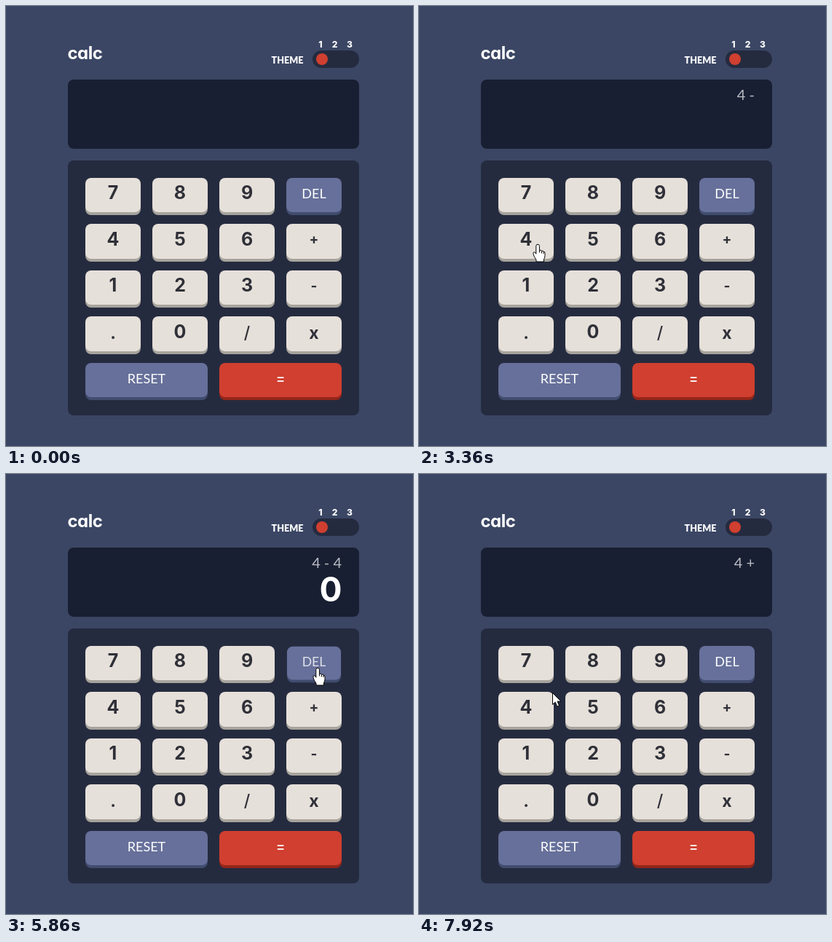
An HTML page that plays this animation: 559 by 604 pixels, repeating every 8 s.

```html
<!DOCTYPE html>
<html lang="en">
<head>
<meta charset="utf-8">
<title>calc</title>
<style>
  html, body { margin: 0; width: 100%; height: 100%; overflow: hidden; background: #3b4664; }
  svg { display: block; width: 559px; height: 604px; }
  text { font-family: Inter, "Open Sans", sans-serif; text-anchor: middle; fill: #fff; }
  .lato, .word { font-family: Lato, "Open Sans", sans-serif; }
  .end { text-anchor: end; }
  .logo { text-anchor: start; font-feature-settings: "cv11"; letter-spacing: -.5px; }
  .digit { font-size: 25px; font-weight: 650; }
  .word { font-size: 18px; font-weight: 400; }
  .sign { font-size: 19px; font-weight: 700; }
  .mark { font-size: 23px; font-weight: 650; }
  #cursor path { fill: #fff; stroke: #000; stroke-linejoin: round; }
</style>
</head>
<body>
<svg viewBox="0 0 559 604">
  <rect width="559" height="604" fill="#3b4664"/>
  <text class="logo" x="84.5" y="72.5" font-size="24" font-weight="700">calc</text>
  <text class="lato" x="386.5" y="79" font-size="12.6" font-weight="900">THEME</text>
  <g font-size="12" font-weight="800">
    <text x="432" y="57">1</text><text x="451.5" y="57">2</text><text x="472" y="57">3</text>
  </g>
  <rect x="421" y="61" width="64" height="24" rx="12" fill="#252b3f"/>
  <circle cx="434" cy="73" r="8" fill="#d03f2f"/>
  <rect x="85" y="101" width="400" height="95" rx="8" fill="#181f32"/>
  <text id="upper" class="lato end" x="461" y="129" font-size="20" style="fill:#babcc4"></text>
  <text id="main" class="end" x="461.5" y="174.5" font-size="46" font-weight="700"></text>
  <rect x="85" y="212" width="400" height="350" rx="8" fill="#252b3f"/>
  <g id="keys"></g>
  <g id="cursor">
    <path id="arrow" d="M0 0V16L3.7 12.7 6.2 18.7 9 17.5 6.6 11.6H11.5Z"/>
    <g id="hand">
      <path d="M-2.7 2a2.3 2.3 0 0 1 4.6 0V8q2.3-1.4 3 .8q2.1-1 2.6 1q2-.5 2 2V15q0 3-1.5 5V23.5H-2.5V21q-3.2-4.5-4-8q-.5-2.5 1.2-2.8q1.4 0 2.6 2.6Z"/>
      <path d="M1.9 8V11M4.9 9V12M7.5 10V12.5" style="fill:none"/>
    </g>
  </g>
</svg>
<script>
const LOOP = 8000, STEP = 1000 / 15, ENTER = 500;
const $ = id => document.getElementById(id);

// Key palettes: face, edge, label
const LIGHT = ['#e6e0da', '#a7a49d', '#2f3038'];
const BLUE = ['#66709a', '#414d6f', '#fff'];
const RED = ['#d03f2f', '#93261a', '#fff'];
const ROWS = ['7 8 9 DEL', '4 5 6 +', '1 2 3 -', '. 0 / x', 'RESET ='];

function make(tag, attrs, parent) {
  const el = document.createElementNS('http://www.w3.org/2000/svg', tag);
  for (const name in attrs) el.setAttribute(name, attrs[name]);
  return parent.appendChild(el);
}

function kindOf(label) {
  if (/\d/.test(label)) return 'digit';
  if (label.length > 1) return 'word';
  return '+-='.includes(label) ? 'sign' : 'mark';
}

const keys = {};
ROWS.forEach((line, row) => {
  const labels = line.split(' '), pitch = 368 / labels.length;
  const y = Math.floor(236 + 63.5 * row);
  const height = Math.floor(283.5 + 63.5 * row) - y;
  labels.forEach((label, col) => {
    const kind = kindOf(label);
    const [face, edge, ink] = kind === 'word' ? BLUE : label === '=' ? RED : LIGHT;
    const x = 109 + pitch * col, width = pitch - 16;
    const g = make('g', {}, $('keys'));
    const box = { x, width, height, rx: 8 };
    make('rect', { ...box, y: y + 4, fill: edge }, g);
    make('rect', { ...box, y, fill: face }, g);
    const rise = { digit: 0, word: -1, sign: -1.5, mark: 1 }[kind];
    const text = make('text', {
      class: kind, x: x + width / 2, y: 265 + 63.5 * row + rise, style: 'fill:' + ink
    }, g);
    if ('/='.includes(label)) text.style.fontWeight = 450;
    text.textContent = label;
    keys[label] = { g, text, x, y, w: width, h: height + 4 };
  });
});

// Each visit: key, when the pointer leaves for it, arrives and presses, and where
const visits = [
  ['4', ENTER, 910, 1440, 152, 319],
  ['-', 1467, 2210, 2410, 388, 392],
  ['4', 2680, 3360, 3580, 163, 327],
  ['=', 3928, 4320, 4580, 354, 494],
  ['DEL', 5120, 5590, 5860, 428, 266],
  ['DEL', 5590, 5590, 6350, 428, 266],
  ['+', 6880, 7220, 7410, 424, 311],
  ['4', 7480, 7870, LOOP, 183, 300]
].map(([label, leave, arrive, press, x, y]) => ({ label, leave, arrive, press, x, y }));

// The picture advances in even steps after each press
function snap(t) {
  const start = Math.max(0, ...[ENTER, ...visits.map(v => v.press)].filter(p => p <= t));
  return start + Math.floor((t - start) / STEP + .01) * STEP;
}

// Pointer eases out along a path that sags when it is mostly level
function pointerAt(t) {
  let x = 538, y = 302;
  for (const v of visits) {
    if (t < v.leave) break;
    const u = Math.min(1, (t - v.leave) / (v.arrive - v.leave || 1));
    const k = 1 - (1 - u) ** 3;
    const dx = v.x - x, dy = v.y - y;
    const sag = 24 * Math.max(0, 1 - Math.abs(dy / (dx || 1)));
    x += dx * k;
    y += dy * k + sag * Math.sin(Math.PI * k);
  }
  return [Math.round(x), Math.round(y)];
}

// Calculator rules for one key
function enter({ upper, main }, label) {
  if (label === 'DEL') return { upper: main ? upper : upper.split(' ')[0], main: '' };
  if (label === '=') {
    const [a, op] = upper.split(' ');
    return { upper: `${upper} ${main}`, main: String(op === '-' ? a - main : +a + +main) };
  }
  if (/\d/.test(label)) return { upper, main: main + label };
  return { upper: `${main || upper} ${label}`, main: '' };
}

const overKey = (x, y) => Object.values(keys).some(k =>
  x > k.x + 2 && x < k.x + k.w - 2 && y > k.y + 2 && y < k.y + k.h - 2);

const show = (el, on) => { el.style.display = on ? '' : 'none'; };

function setPress(key, p) {
  const cx = key.x + key.w / 2, cy = key.y + key.h / 2;
  key.g.setAttribute('transform',
    p ? `translate(${cx} ${cy}) scale(${1 - .05 * p}) translate(${-cx} ${-cy})` : '');
  key.text.style.opacity = 1 - .4 * p;
}

function draw(time) {
  const t = snap(time);
  const depth = {};
  let display = { upper: '', main: '' };
  for (const { label, press } of visits) {
    const age = t - press;
    if (age >= 60) display = enter(display, label);
    if (age >= 0 && age < 270) depth[label] = Math.min((age + 50) / 100, (270 - age) / 200, 1);
  }
  $('upper').textContent = display.upper;
  $('main').textContent = display.main;
  for (const label in keys) setPress(keys[label], depth[label] || 0);

  const [x, y] = pointerAt(t);
  const hand = overKey(x, y);
  show($('cursor'), t >= ENTER);
  show($('hand'), hand);
  show($('arrow'), !hand);
  $('cursor').setAttribute('transform', `translate(${x + .5} ${y + .5})`);
}

const begin = performance.now();
function frame() {
  draw((performance.now() - begin) % LOOP);
  requestAnimationFrame(frame);
}
frame();
</script>
</body>
</html>
```
